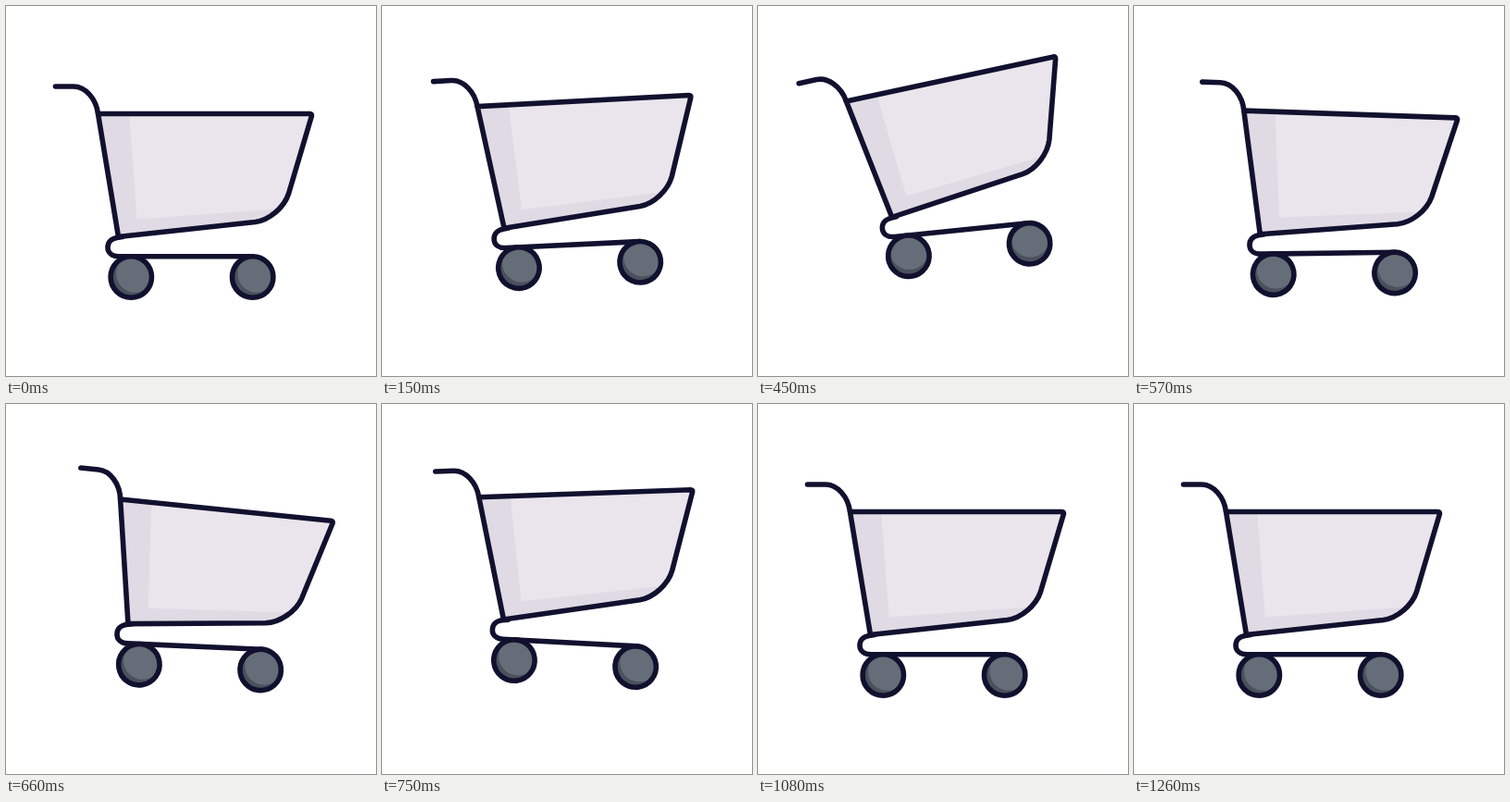
Write an HTML page that moves like this. It is 400 px wide and 400 px high and loops after 3290 ms.

```html
<!DOCTYPE html>
<html lang="en">
<head>
<meta charset="utf-8">
<title>Hopping shopping cart</title>
<style>
  html, body { margin: 0; width: 100%; height: 100%; overflow: hidden; background: #fff; }
  svg { display: block; width: 100%; height: 100%; }
  .line { fill: none; stroke: #11112f; stroke-width: 5.6; stroke-linecap: round; stroke-linejoin: round; }
  .shade { fill: #e0dae4; }
  .light { fill: #eae5ec; }
  .tyre { fill: #4a515d; }
  .hub { fill: #656d78; }
</style>
</head>
<body>
<svg viewBox="0 0 400 400">
  <defs>
    <path id="shell" d="M121.500 249.500 L99.500 116.500 H328.500 Q331 116.500 330.400 119 L305.500 203 C300.500 218 284.500 231.500 269.500 233.500 Z"/>
    <clipPath id="inside"><use href="#shell"/></clipPath>
    <clipPath id="disc"><circle r="22.2"/></clipPath>
    <g id="wheel">
      <circle class="tyre" r="22.2"/>
      <circle class="hub" cx="4.500" cy="-4" r="20.8" clip-path="url(#disc)"/>
      <circle class="line" r="22.2"/>
    </g>
  </defs>
  <g id="cart">
    <g id="basket">
      <use href="#shell" class="shade"/>
      <path class="light" clip-path="url(#inside)" d="M133 112 L141.500 230.500 L300 219 L345 205 V112 Z"/>
      <use href="#shell" class="line"/>
      <path class="line" d="M53.500 87 H73 C86 87 97.500 100.500 99.500 116.500"/>
    </g>
    <path class="line" d="M126 249.500 L120 250.400 C113 251.500 110 256 110 261 C110 267 115 270.800 122 270.800 H267"/>
    <g transform="translate(135.300 293)"><use href="#wheel" class="spin"/></g>
    <g transform="translate(266.700 293)"><use href="#wheel" class="spin"/></g>
  </g>
</svg>
<script>
  const LOOP = 3290, STEP = 30;
  const cart = document.getElementById('cart');
  const basket = document.getElementById('basket');
  const wheels = document.querySelectorAll('.spin');

  const ease = u => (1 - Math.cos(Math.PI * Math.min(Math.max(u, 0), 1))) / 2;

  // Adds up eased moves between turning points given as [time, value].
  const glide = (...stops) => t => {
    let value = 0, from = 0;
    for (const [time, to] of stops) {
      value += (to - value) * ease((t - from) / (time - from));
      if (t <= time) break;
      from = time;
    }
    return value;
  };

  // Height of a ballistic hop, zero outside it.
  const hop = (t, mid, half, height) => height * Math.max(0, 1 - ((t - mid) / half) ** 2);

  const drift = glide([330, 29.3], [390, 29.3], [690, 8], [1080, 0]);
  const tilt = glide([360, -7.4], [720, 3.2], [930, 0]);
  const swing = glide([450, -12.1], [630, 6.6], [810, -4.9], [990, 3.4], [1080, 0]);
  const lift = t => t < 360
    ? 35.3 * ease(t / 360)
    : hop(t, 360, 222, 35.3) + hop(t, 765, 185, 12.5);

  function draw(now) {
    const t = Math.floor((now % LOOP) / STEP) * STEP;
    const dx = drift(t), lean = tilt(t);
    cart.setAttribute('transform',
      `translate(${dx} ${-lift(t)}) rotate(${lean} 201 293)`);
    basket.setAttribute('transform', `rotate(${swing(t) - lean} 121.5 249.5)`);
    wheels.forEach(w => w.setAttribute('transform', `rotate(${-1.3 * dx})`));
  }

  let start;
  function tick(now) {
    start ??= now;
    draw(now - start);
    requestAnimationFrame(tick);
  }
  draw(0);
  requestAnimationFrame(tick);
</script>
</body>
</html>
```
